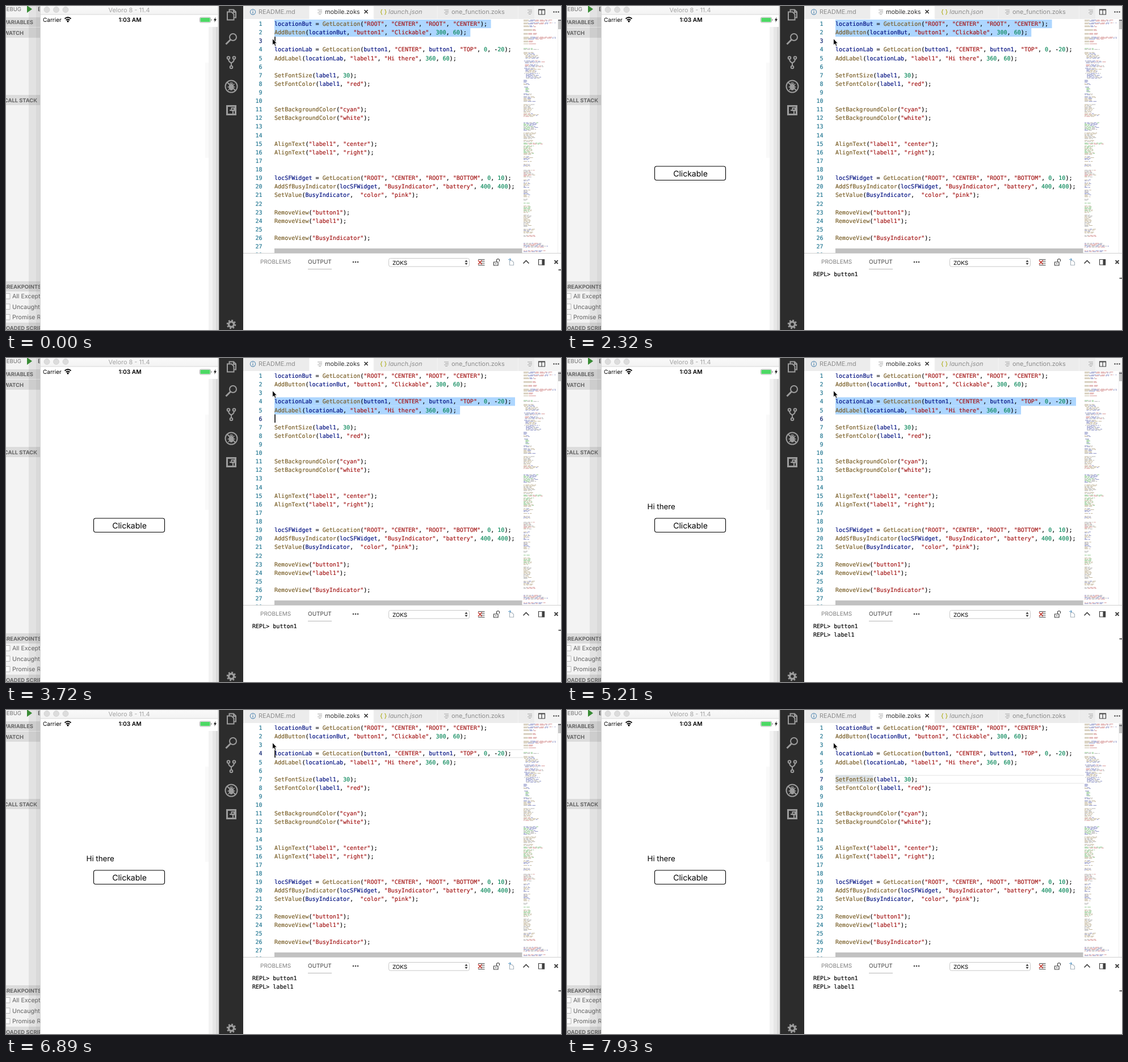
An HTML page for the animation above (8000 ms loop, 978x572 px).

```html
<!DOCTYPE html>
<html lang="en">
<head>
<meta charset="utf-8">
<title>Live scripting</title>
<style>
  html, body { margin: 0; width: 100%; height: 100%; overflow: hidden; background: #fff; }
  svg { display: block; width: 978px; height: 572px; }
  text { font: 10.9px Inter, "Open Sans", sans-serif; white-space: pre; text-rendering: geometricPrecision; }
  .mono text, text.mono {
    font: 10.06px "DejaVu Sans Mono", "Liberation Mono", monospace;
    fill: currentColor; stroke: currentColor; stroke-width: .18px;
  }
  .mono tspan { fill: currentColor; stroke: currentColor; }
  .head text { font-size: 9.4px; font-weight: 700; fill: #646464; }
  .opt text { font-size: 10.6px; fill: #616161; }
  .tab { fill: #8c8c8c; }
  .caps { font-size: 10px; }
  .fn { color: #795e26; } .id { color: #001080; } .str { color: #a31515; } .num { color: #09885a; }
  .no { color: #237893; text-anchor: end; }
  .no.now { color: #0b216f; }
  .sel { fill: #add6ff; }
  .word { fill: #dbe1e5; }
</style>
</head>
<body>
<svg viewBox="0 0 978 572">
  <defs>
    <clipPath id="view"><path d="M418 23H978V436H418z"/></clipPath>
    <linearGradient id="bar" x2="0" y2="1">
      <stop stop-color="#fafafa"/><stop offset="1" stop-color="#f3f3f3"/>
    </linearGradient>
  </defs>

  <!-- debug sidebar -->
  <path fill="#f3f3f3" d="M0 0H62V572H0z"/>
  <path fill="#dcdcdc" d="M0 20H62V37H0zM0 38H62V56H0zM0 157H62V175H0zM0 486H62V504H0zM0 559H62V572H0z"/>
  <path fill="#000" opacity=".07" d="M40 0H60V572H40z"/>
  <path fill="#000" opacity=".04" d="M53 0H60V572H53z"/>
  <text x="27" y="9" text-anchor="end" style="font-size:9.6px" fill="#6f6f6f">DEBUG</text>
  <path fill="#388a34" d="M37 -1L46 5.5L37 12z"/>
  <text x="56" y="9" style="font-size:10px" fill="#333">E</text>
  <g class="head">
    <text x="48" y="32" text-anchor="end">VARIABLES</text>
    <text x="31" y="50.5" text-anchor="end">WATCH</text>
    <text x="55" y="169.5" text-anchor="end">CALL STACK</text>
    <text x="-5" y="498.5">BREAKPOINTS</text>
    <text x="-5" y="571.5">LOADED SCRIPTS</text>
  </g>
  <g class="opt">
    <text x="11" y="516">All Exceptions</text>
    <text x="11" y="534.5">Uncaught Exceptions</text>
    <text x="11" y="553">Promise Rejections</text>
    <path fill="#fff" stroke="#b9b9b9" d="M-3 507.5H7V517H-3zM-3 526H7V535.5H-3zM-3 544.5H7V554H-3z"/>
  </g>

  <!-- simulator -->
  <path fill="#fff" d="M60.5 0H376V572H60.5z"/>
  <path fill="#f9f9f9" d="M351 100H357V268H351z"/>
  <path fill="#f2f2f2" d="M357 37H364V572H357z"/>
  <path fill="#e7e7e7" d="M364 37H370V572H364z"/>
  <path fill="#d9d9d9" d="M370 37H376V572H370zM373 0H376V37H373z"/>
  <path fill="url(#bar)" d="M60.5 0H373V14.5H60.5z"/>
  <path stroke="#d4d4d4" d="M60.5 15H373M60.5 0V572"/>
  <g fill="#dcdcdc" stroke="#cacaca" stroke-width=".7">
    <circle cx="72" cy="6.5" r="5"/><circle cx="88.5" cy="6.5" r="5"/><circle cx="105" cy="6.5" r="5"/>
  </g>
  <text x="217" y="10.5" text-anchor="middle" fill="#a3a3a3">Veloro 8 - 11.4</text>
  <text x="65" y="28" style="font-size:10px">Carrier</text>
  <g fill="none" stroke="#000" stroke-width="1.7">
    <path d="M103.5 22.5Q109 17.5 114.5 22.5M105.7 25Q109 22 112.3 25"/>
    <circle cx="109" cy="27" r=".8"/>
  </g>
  <text x="218.5" y="28" text-anchor="middle" style="font-size:10.2px;font-weight:600">1:03 AM</text>
  <rect x="341.5" y="20" width="19" height="9" rx="2" fill="#fff" stroke="#9b9b9b" stroke-width=".8"/>
  <rect x="342.5" y="21" width="17" height="7" rx="1" fill="#4cd964"/>
  <path fill="#9b9b9b" d="M361.5 23H362.7V26H361.5z"/>
  <path fill="#111" d="M369.5 19.5L366 25.2H368.2L367.2 29L371 23.3H368.7z"/>
  <g id="button">
    <rect x="154.5" y="283" width="125" height="24.5" rx="3.5" fill="#fff" stroke="#000" stroke-width="1.1"/>
    <text x="217.5" y="300.5" text-anchor="middle" style="font-size:14px">Clickable</text>
  </g>
  <text id="label" x="141.5" y="266.5" style="font-size:13.3px">Hi there</text>

  <!-- activity bar -->
  <path fill="#2c2c2c" d="M375.3 0H418V572H375.3z"/>
  <g fill="none" stroke="#9c9c9c" stroke-width="2">
    <path d="M393.5 10V6.5H401L405 10.5V20.5H402M390 10.5H397.5L401.5 14.5V24.5H390zM401 6.5V11H405"/>
    <circle cx="400" cy="55" r="6"/><path stroke-width="3" d="M395.5 59.5L387.5 67.5"/>
    <circle cx="392" cy="91.5" r="2.3"/><circle cx="402" cy="91.5" r="2.3"/><circle cx="397" cy="108" r="2.3"/>
    <path d="M392 94Q392 98 397 100.5Q402 98 402 94M397 100V106"/>
    <circle cx="397" cy="142" r="10.5"/>
    <ellipse cx="397" cy="143" rx="3.5" ry="5" fill="#9c9c9c"/>
    <path d="M389.5 134.5L404.5 149.5"/>
    <path stroke-width="1.4" d="M390.5 143H403.5M391.5 148.5L394 146M402.5 137.5L400 140M394 137Q397 134 400 137"/>
    <path stroke-width="3" d="M389.5 176.5H404.5V191.5H389.5z"/>
    <path d="M394 184H400V190M397.5 180H402V184.5H397.5z"/>
    <circle cx="397" cy="562" r="4.5" stroke-width="3.4"/>
    <circle cx="397" cy="562" r="7" stroke-width="2.6" stroke-dasharray="2.75 2.75"/>
  </g>

  <!-- tabs -->
  <path fill="#fff" d="M418 0H978V572H418z"/>
  <path fill="#f3f3f3" d="M418 0H978V23H418z"/>
  <path fill="#ececec" d="M418 0H534V23H418zM648.5 0H759.5V23H648.5zM760.5 0H902V23H760.5zM903 0H931V23H903z"/>
  <path fill="#fff" d="M534.5 0H647.5V24H534.5z"/>
  <circle cx="435" cy="10.5" r="4.6" fill="none" stroke="#5a8db5" stroke-width="1.1"/>
  <path stroke="#5a8db5" stroke-width="1.3" d="M435 9.8V13.2M435 7.5V8.8"/>
  <text class="tab" x="445" y="14">README.md</text>
  <g stroke="#a9a9a9" fill="none">
    <path id="rows" d="M549 7H557M551 9.5H557M549 12H557M551 14.5H555"/>
    <use href="#rows" x="223"/><use href="#rows" x="370"/>
  </g>
  <text x="562" y="14" fill="#333">mobile.zoks</text>
  <path stroke="#333" stroke-width="1.7" d="M631.5 7L637.5 13M637.5 7L631.5 13"/>
  <text x="659" y="14" fill="#b7b73b" style="font-weight:600;font-size:10.5px">{ }</text>
  <text class="tab" x="674" y="14" style="font-style:italic">launch.json</text>
  <text class="tab" x="785" y="14">one_function.zoks</text>
  <path fill="none" stroke="#424242" stroke-width="1.2" d="M938.5 6H949.5V15H938.5zM944 6V15M938.5 7H949.5"/>
  <g fill="#424242">
    <circle cx="965.5" cy="10.5" r="1.2"/><circle cx="969.5" cy="10.5" r="1.2"/><circle cx="973.5" cy="10.5" r="1.2"/>
  </g>

  <!-- editor -->
  <g clip-path="url(#view)">
    <path id="lineBox" fill="none" stroke="#e9e9e9" stroke-width="1.4" d="M473 .7H911M473 14.7H911"/>
    <g id="marks"></g>
    <g id="code" class="mono"></g>
    <path id="caret" d="M473.2 0H474.8V14.6H473.2z"/>
    <g id="map" fill="none" opacity=".45"></g>
    <path stroke="#eee" d="M972.5 24V436"/>
    <path fill="#c6c6c6" d="M973 24H978V41H973z"/>
    <path id="ruler" fill="#55555c" d="M973 0H978V1.5H973z"/>
    <path fill="#c1c1c1" d="M473 428H909.5V436H473z"/>
  </g>

  <!-- output panel -->
  <path stroke="#cfcfcf" d="M418 436.5H978"/>
  <text class="caps" x="448" y="454.8" fill="#808080">PROBLEMS</text>
  <text class="caps" x="532" y="454.8" fill="#424242">OUTPUT</text>
  <path stroke="#b5b5b5" d="M532 464.5H574"/>
  <g fill="#424242">
    <circle cx="612" cy="452" r="1.3"/><circle cx="616" cy="452" r="1.3"/><circle cx="620" cy="452" r="1.3"/>
  </g>
  <rect x="674.5" y="445.5" width="142" height="14.5" rx="3" fill="#fff" stroke="#c8c8c8"/>
  <text x="681" y="456.5" style="font-size:9.8px">ZOKS</text>
  <path fill="#333" d="M808.5 451.7L811 448.5L813.5 451.7zM808.5 453.7L811 457L813.5 453.7z"/>
  <g fill="none" stroke="#424242" stroke-width="1.2">
    <path d="M832 447.5H843.5M836 450.5H843.5M836 454H843.5M832 457.5H843.5"/>
    <path stroke="#c2352b" stroke-width="1.5" d="M832 449L838.5 456M838.5 449L832 456"/>
    <path d="M859.5 452H867V458H859.5zM864.5 452V449Q864.5 446.5 867 446.5Q869.5 446.5 869.5 449V451M863.2 454V456"/>
    <path stroke="#a9b4bd" d="M887.5 449.5H891.5L894.5 452.5V457.5H887.5z"/>
    <path stroke="#6da4cc" d="M885 447.5H889.5M887.5 445.5L889.5 447.5L887.5 449.5"/>
    <path stroke-width="1.7" d="M911.5 454.5L916.5 449.5L921.5 454.5"/>
    <path d="M938.5 447.5H948.5V457H938.5z"/><path fill="#424242" d="M945 447.5H948.5V457H945z"/>
    <path stroke-width="1.9" d="M966.5 449L972.5 455M972.5 449L966.5 455"/>
  </g>
  <text id="out1" class="mono" x="434" y="476.5">REPL&gt; button1</text>
  <text id="out2" class="mono" x="434" y="491.6">REPL&gt; label1</text>
  <path id="outMark" fill="#444" d="M973.5 0H978V1.7H973.5z"/>

  <path stroke="#fff" stroke-width=".9" d="M469.5 57.5V69L472.1 66.7L474 71L476 70.1L474.1 66H477.4z"/>
</svg>

<script>
const LOOP = 8000, LEFT = 473, TOP = 24, STEP = 15.12, CHAR = 6.057;
const $ = id => document.getElementById(id);
const lineTop = n => TOP + STEP * (n - 1);

const code = `locationBut = GetLocation("ROOT", "CENTER", "ROOT", "CENTER");
AddButton(locationBut, "button1", "Clickable", 300, 60);

locationLab = GetLocation(button1, "CENTER", button1, "TOP", 0, -20);
AddLabel(locationLab, "label1", "Hi there", 360, 60);

SetFontSize(label1, 30);
SetFontColor(label1, "red");


SetBackgroundColor("cyan");
SetBackgroundColor("white");


AlignText("label1", "center");
AlignText("label1", "right");


locSFWidget = GetLocation("ROOT", "CENTER", "ROOT", "BOTTOM", 0, 10);
AddSfBusyIndicator(locSFWidget, "BusyIndicator", "battery", 400, 400);
SetValue(BusyIndicator,  "color", "pink");

RemoveView("button1");
RemoveView("label1");

RemoveView("BusyIndicator");

`.split("\n");

const paint = s => s.replace(/("[^"]*")|([A-Za-z]\w*)(?=\()|([A-Za-z]\w*)|(\d+)/g,
  (m, str, fn, id) => `<tspan class="${str ? "str" : fn ? "fn" : id ? "id" : "num"}">${m}</tspan>`);

$("code").innerHTML = code.map((s, i) => {
  const y = (lineTop(i + 1) + 11.05).toFixed(2);
  return `<text class="no" x="451.5" y="${y}">${i + 1}</text><text x="${LEFT}" y="${y}">${paint(s)}</text>`;
}).join("");
const numbers = [...document.querySelectorAll(".no")];

// Highlight boxes behind the code: class, line, first column, columns, start, end
const marks = [
  ["sel", 1, 0, 63, 0, 2950], ["sel", 2, 0, 57, 0, 2950],
  ["sel", 4, 0, 70, 3540, 5810], ["sel", 5, 0, 54, 3720, 5810],
  ["word", 4, 0, 11, 3240, 3540], ["word", 5, 9, 11, 3240, 3540],
  ["word", 7, 0, 11, 7780, LOOP]
].map(([cls, line, col, len, from, to]) => {
  const box = document.createElementNS("http://www.w3.org/2000/svg", "rect");
  const set = { class: cls, x: LEFT + col * CHAR, y: lineTop(line), width: len * CHAR, height: STEP };
  for (const k in set) box.setAttribute(k, set[k]);
  $("marks").append(box);
  return { box, from, to };
});

// Minimap
let seed = 7;
const rnd = () => (seed = seed * 16807 % 2147483647) / 2147483647;
const ink = { b: "#795e26", r: "#a31515", g: "#008000", n: "#001080", k: "#555" };
const strokes = { b: "", r: "", g: "", n: "", k: "" };
const dash = (x, y, w, c) => { strokes[c] += `M${(912 + x * .84).toFixed(1)} ${y.toFixed(1)}h${(w * .84).toFixed(1)}`; };
code.forEach((s, i) => {
  for (const m of s.matchAll(/"[^"]*"|\w+/g))
    dash(m.index, TOP + .8 + i * 1.68, m[0].length, m[0][0] === '"' ? "r" : m.index ? "n" : "b");
});
// y, rows, indent, widest row, inks
const blocks = [
  [75, 2, 0, 38, "gk"], [82, 2, 0, 28, "nb"], [85.5, 5, 4, 34, "nbk"], [97, 7, 3, 44, "nrk"],
  [110, 5, 4, 34, "nb"], [119, 6, 5, 32, "nk"], [131, 3, 0, 8, "n"], [137, 2, 0, 16, "bn"],
  [143, 6, 4, 10, "gn"], [155, 10, 0, 28, "nbk"], [174, 9, 0, 24, "bk"], [190, 4, 0, 34, "nrb"],
  [206, 9, 0, 34, "gnk"], [224, 10, 0, 34, "kb"], [242, 2, 0, 42, "rg"], [247, 10, 0, 22, "gb"],
  [266, 13, 0, 24, "nb"], [290, 8, 0, 28, "brk"], [307, 9, 0, 14, "nb"], [325, 8, 0, 16, "bn"],
  [341, 3, 0, 14, "nk"], [348, 11, 0, 18, "bg"], [369, 13, 0, 18, "kb"], [394, 5, 0, 24, "bn"],
  [405, 2, 0, 26, "rk"], [419, 5, 0, 54, "nrk"], [432, 2, 0, 50, "nr"]
];
for (const [y, rows, indent, width, inks] of blocks)
  for (let i = 0; i < rows; i++) {
    if (i && rnd() < .15) continue;
    const end = indent + width * (.5 + .5 * rnd());
    for (let x = indent * (i ? 1 : .3); x < end - 2;) {
      const w = Math.min(2 + rnd() * 7, end - x);
      dash(x, y + i * 1.68, w, inks[Math.floor(rnd() * inks.length)]);
      x += w + 1.6;
    }
  }
$("map").innerHTML = Object.keys(ink).map(c => `<path stroke="${ink[c]}" d="${strokes[c]}"/>`).join("");

// Time and the line the caret moves to
const moves = [[0, 3], [2950, 4], [3540, 5], [3720, 6], [5810, 3], [6890, 4], [7070, 5], [7280, 6], [7450, 7]];
const caretOn = [[0, 290], [830, 1430], [1870, 2320], [2800, 4320], [4770, 5210], [5810, 6410], [6890, 7930]];
const plainLine = [[2950, 3540], [5810, LOOP]];
const appear = { button: 1570, out1: 1870, label: 4770, out2: 5060 };

const within = (t, spans) => spans.some(([a, b]) => t >= a && t < b);
const show = (el, on) => { el.style.visibility = on ? "visible" : "hidden"; };
const place = (id, y) => $(id).setAttribute("transform", `translate(0 ${y})`);

function draw(t) {
  const line = moves.filter(m => m[0] <= t).pop()[1];
  place("caret", lineTop(line));
  place("lineBox", lineTop(line));
  place("ruler", 22.6 + line * .6);
  place("outMark", t < appear.out1 ? 465 : t < appear.out2 ? 479.8 : 495);
  show($("caret"), within(t, caretOn));
  show($("lineBox"), within(t, plainLine));
  numbers.forEach((n, i) => n.classList.toggle("now", i + 1 === line));
  for (const { box, from, to } of marks) show(box, t >= from && t < to);
  for (const id in appear) show($(id), t >= appear[id]);
}

const start = performance.now();
function tick() {
  draw((performance.now() - start) % LOOP);
  requestAnimationFrame(tick);
}
tick();
</script>
</body>
</html>
```
